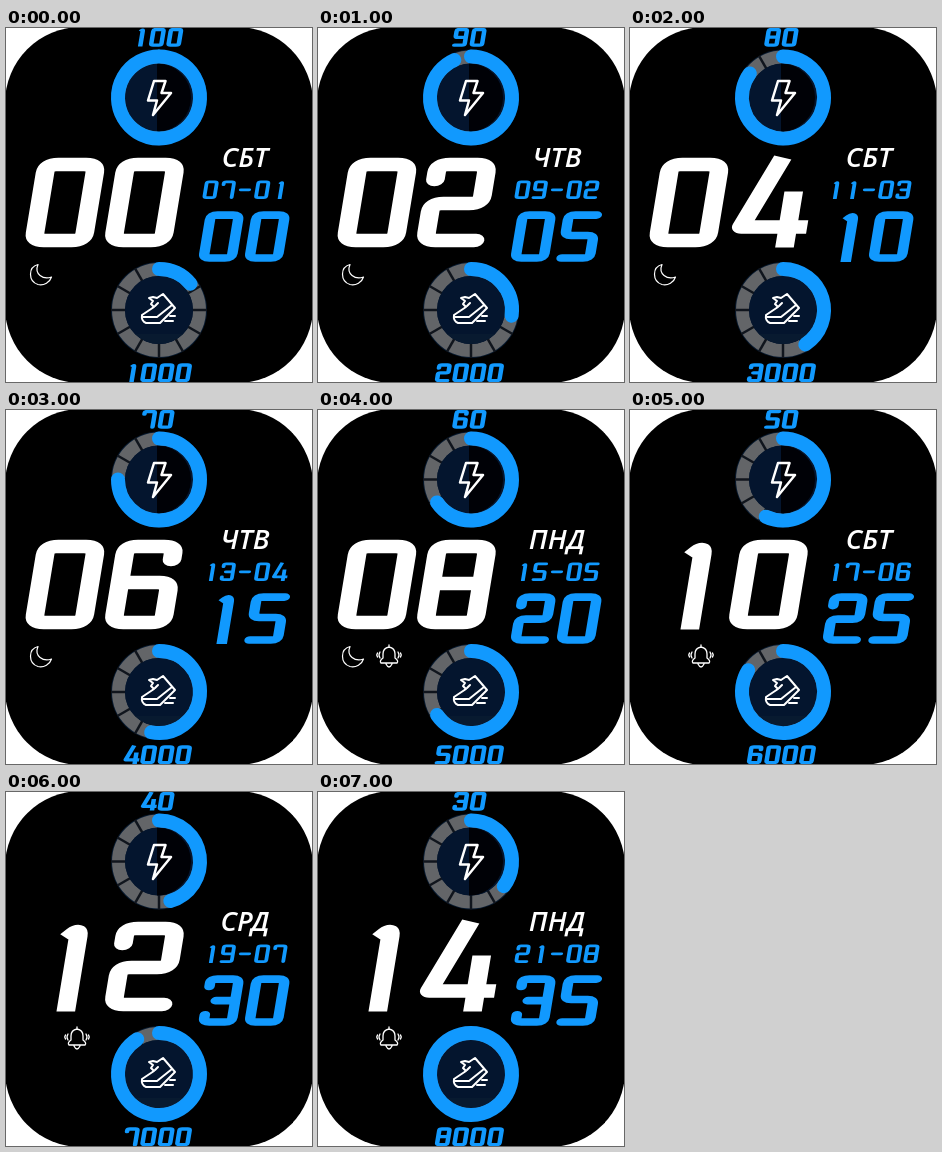
Write an HTML page that moves like this. It is 306 px wide and 354 px high and loops after 8 s.

```html
<!DOCTYPE html>
<html lang="ru">
<head>
<meta charset="utf-8">
<title>Watch face</title>
<style>
html, body { margin: 0; width: 100%; height: 100%; overflow: hidden; background: #fff; }
svg { display: block; width: 306px; height: 354px; }
.line { fill: none; stroke: #fff; stroke-linecap: round; stroke-linejoin: round; }
.digits path { fill: none; stroke-width: 13.5; stroke-linejoin: round; }
.digits .bold path { stroke-width: 16; }
.white { stroke: #fff; }
.blue { stroke: #1199fe; }
#day { font: italic 600 27.5px "Open Sans", "Noto Sans", sans-serif; fill: #fff; text-anchor: middle; }
</style>
</head>
<body>
<svg viewBox="0 0 306 354">
  <rect x="-1" y="-1" width="308" height="356" rx="76" fill="#000"/>
  <g id="battery" transform="translate(153 69.5)"></g>
  <g id="steps" transform="translate(153 282)"></g>

  <path class="line" stroke-width="2.5" d="M148 53H159.500L155.500 65H165L147 87L151 72.500H142Z"/>
  <g class="line" stroke-width="2">
    <path d="M136 287L148 279L145 276L147 273L143 270L147 269L151 270L157 266L169 280L154 295H140Q135 293 136 287"/>
    <path d="M137 289H151L166 277M149 278L152 275M164 288H169M159 293H167"/>
  </g>

  <path id="moon" class="line" stroke="#ddd" stroke-width="1.2" d="M32 236.500C22 239 22 253 32 256.500C38 258 44 254 45.500 249C37 252 28 246 32 236.500Z"/>
  <g id="bell" class="line" stroke-width="1.3">
    <path d="M63 253Q61 251 65 248V244Q65 238 71 237Q77 238 77 244V248Q81 251 79 253ZM68 254Q71 260 74 254M71 235V237"/>
    <path d="M62 242Q60 245 62 248M80 242Q82 245 80 248M59.500 243Q58 245 59.500 247M82.500 243Q84 245 82.500 247"/>
  </g>

  <g class="digits">
    <g id="level" class="blue bold"></g>
    <g id="hour" class="white"></g>
    <g id="date" class="blue"></g>
    <g id="minute" class="blue"></g>
    <g id="count" class="blue bold"></g>
  </g>
  <text id="day" x="239" y="139"></text>
</svg>
<script>
const $ = id => document.getElementById(id);

// Digit centre lines in a 50 x 90 box; "z" closes a line.
const glyphs = {
  0: '7,7 43,7 43,83 7,83 z',
  1: '23,17 31,7 31,90',
  2: '7,22 7,7 43,7 43,46 7,46 7,83 43,83',
  3: '7,20 7,7 43,7 43,83 7,83 7,70|18,45 43,45',
  4: '30,0 8,69.5 56,69.5|42,34 42,90',
  5: '43,7 7,7 7,43 43,43 43,83 7,83',
  6: '42,20 42,7 7,7 7,83 43,83 43,43 7,43',
  7: '7,20 7,7 43,7 43,83',
  8: '7,7 43,7 43,83 7,83 z|7,44 43,44',
  9: '43,46 7,46 7,7 43,7 43,83 7,83',
  '-': '10,45 40,45'
};

// Polyline with rounded corners
function roundLine(text, radius) {
  const closed = text.endsWith('z');
  const pts = text.replace(' z', '').split(' ').map(p => p.split(',').map(Number));
  const n = pts.length;
  const toward = (a, b) => {
    const f = Math.min(0.5, radius / Math.hypot(b[0] - a[0], b[1] - a[1]));
    return [a[0] + (b[0] - a[0]) * f, a[1] + (b[1] - a[1]) * f];
  };
  let d = '';
  pts.forEach((p, i) => {
    if (!closed && (i === 0 || i === n - 1)) {
      d += (i ? 'L' : 'M') + p;
      return;
    }
    const from = toward(p, pts[(i + n - 1) % n]);
    const to = toward(p, pts[(i + 1) % n]);
    d += (i ? 'L' : 'M') + from + 'Q' + p + ' ' + to;
  });
  return d + (closed ? 'Z' : '');
}

const shapes = {};
for (const key in glyphs)
  shapes[key] = glyphs[key].split('|').map(s => roundLine(s, key === '4' ? 1 : 8)).join('');

// x and y give the lower left corner; 1 and 4 have flat ends
function write(id, text, x, y, scale, step) {
  $(id).innerHTML = [...text].map((c, i) =>
    `<path d="${shapes[c]}" stroke-linecap="${'14'.includes(c) ? 'butt' : 'round'}" transform="translate(${x + i * step} ${y}) skewX(-9.4) scale(${scale * 1.38} ${scale}) translate(0 -90)"/>`
  ).join('');
}

const centered = (id, text, y) => write(id, text, 151.5 - text.length * 8.7, y, 0.205, 17.4);

function buildRing(id, disc, shade) {
  let marks = '';
  for (let a = 0; a < 360; a += 30)
    marks += `<path d="M0-33V-48" stroke="#10151d" stroke-width="2.5" transform="rotate(${a})"/>`;
  $(id).innerHTML = `<circle r="48" fill="#071a30"/>
    <circle r="40.500" fill="none" stroke="#636568" stroke-width="13"/>${marks}
    <circle r="34" fill="${disc}"/>${shade}
    <path class="arc blue" fill="none" stroke-width="14" stroke-linecap="round"/>`;
}

function setRing(id, angle) {
  const r = 41;
  const a = Math.min(angle, 359.9) * Math.PI / 180;
  const end = `${r * Math.sin(a)} ${-r * Math.cos(a)}`;
  $(id).querySelector('.arc').setAttribute('d', `M0 ${-r}A${r} ${r} 0 ${angle > 180 ? 1 : 0} 1 ${end}`);
}

const days = ['СБТ', 'ЧТВ', 'СБТ', 'ЧТВ', 'ПНД', 'СБТ', 'СРД', 'ПНД'];
const levelAngles = [360, 336, 306, 270, 236, 205, 164, 127];
const stepAngles = [50, 98, 147, 191, 236, 302, 328, 360];
const pad = n => String(n).padStart(2, '0');

function draw(k) {
  centered('level', String(100 - 10 * k), 18.5);
  centered('count', String(1000 * (k + 1)), 354);
  write('hour', pad(2 * k), 17, 219.5, 1, 79.5);
  write('date', pad(7 + 2 * k) + '-' + pad(k + 1), 196, 171, 0.205, 17.2);
  write('minute', pad(5 * k), 191.5, 234, 0.565, 46);
  $('day').textContent = days[k];
  setRing('battery', levelAngles[k]);
  setRing('steps', stepAngles[k]);
  $('moon').style.display = k < 5 ? '' : 'none';
  $('bell').style.display = k >= 4 ? '' : 'none';
}

buildRing('battery', '#04152e', '<path d="M-2-34A34 34 0 0 1-2 34Z" fill="#000106"/>');
buildRing('steps', '#04152e', '<path d="M-24 24H24A34 34 0 0 1-24 24Z" fill="#081a30"/>');
draw(0);

let shown = 0;
const start = performance.now();
function tick() {
  const k = Math.floor((performance.now() - start) / 1000) % 8;
  if (k !== shown) draw(shown = k);
  requestAnimationFrame(tick);
}
requestAnimationFrame(tick);
</script>
</body>
</html>
```
